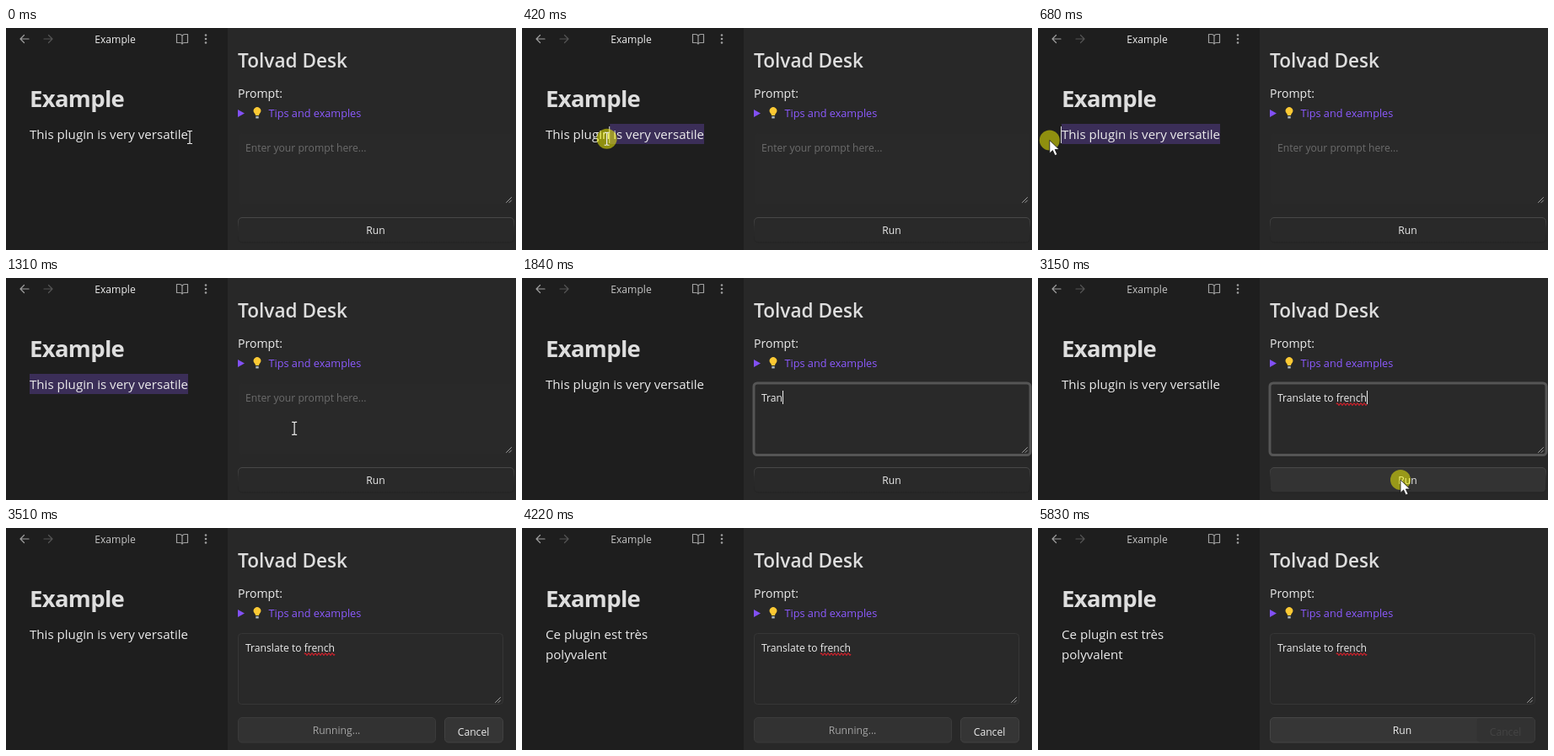
Recreate the animation shown at these times as an HTML page. Size 605 by 264 pixels, loop 6400 ms.

```html
<!DOCTYPE html>
<html lang="en">
<head>
<meta charset="utf-8">
<style>
  html, body { margin: 0; width: 100%; height: 100%; overflow: hidden; background: #1e1e1e; }
  svg { display: block; }
  text { font: 12.15px "Open Sans", "Noto Sans", sans-serif; fill: #ececec; white-space: pre; }
  .mid { text-anchor: middle; }
  .body { font-size: 15.1px; }
  .line { fill: none; stroke: #a0a0a0; stroke-width: 1.2; stroke-linecap: round; stroke-linejoin: round; }
</style>
</head>
<body>
<svg width="605" height="264" viewBox="0 0 605 264">
  <defs>
    <linearGradient id="edgeFade" x2="0" y2="1">
      <stop stop-color="#484848"/>
      <stop offset=".4" stop-color="#2c2c2c"/>
      <stop offset="1" stop-color="#222"/>
    </linearGradient>
  </defs>
  <rect width="605" height="264" fill="#1e1e1e"/>
  <rect x="263" width="342" height="264" fill="#282828"/>

  <!-- Note pane -->
  <path class="line" d="M27 13H17m4.500-4.500L17 13l4.500 4.500"/>
  <path class="line" style="stroke:#555" d="M45 13h10m-4.500-4.500L55 13l-4.500 4.500"/>
  <path class="line" d="M209 9.500v9.500M209 9.500q-1-2-3-2h-3.500v10h4q2 0 2.500 1.500q.5-1.500 2.500-1.500h4v-10h-3.500q-2 0-3 2"/>
  <g fill="#a0a0a0">
    <circle cx="237" cy="8.500" r="1.300"/><circle cx="237" cy="13" r="1.300"/><circle cx="237" cy="17.500" r="1.300"/>
  </g>
  <text id="tab" class="mid" x="129.500" y="18">Example</text>
  <text x="28" y="94" style="font-size:27.5px;font-weight:700;letter-spacing:-.025em;fill:#dedede">Example</text>
  <rect id="selection" y="114" height="24" fill="#3b2e58"/>
  <rect id="noteCaret" y="117" width="1" height="20" fill="#dadada"/>
  <text id="note" class="body" x="28" y="132">This plugin is very versatile</text>
  <g id="reply">
    <text class="body" x="28" y="132">Ce plugin est très</text>
    <text class="body" x="28" y="156">polyvalent</text>
  </g>

  <!-- Prompt pane -->
  <text x="275" y="47" style="font-size:22.6px;font-weight:600;fill:#dedede">Tolvad Desk</text>
  <text x="275" y="83" style="font-size:14.1px">Prompt:</text>
  <path d="M275 97l8 4.500l-8 4.500z" fill="#8250f5"/>
  <path d="M296 104q0-1.500-1.500-3a4.300 4.300 0 1 1 7 0q-1.500 1.500-1.500 3z" fill="#fcc934"/>
  <path d="M296.300 105h3.400v2.500h-3.400z" fill="#a8b4bc"/>
  <text x="311.500" y="106" style="font-size:12.7px;fill:#8c5aff">Tips and examples</text>

  <rect id="field" x="275.500" y="125.500" height="84" rx="4" fill="#292929"/>
  <rect id="ring" x="275" y="125" width="328" height="85.500" rx="4" fill="none" stroke="#555" stroke-width="3"/>
  <path id="grip" class="line" style="stroke-width:1" d="M-9.500 207.500l6-6M-6 207.500l2.500-2.500"/>
  <text id="hint" x="284" y="147" style="fill:#6c6c6c">Enter your prompt here...</text>
  <text id="typed" x="284" y="147"></text>
  <rect id="caret" y="134" width="1" height="16" fill="#f0f0f0"/>
  <path id="squiggle" fill="none" stroke="#e0202c" stroke-width="1.100"/>

  <g id="idle">
    <rect id="runBox" x="275.500" y="225.500" height="29.500" rx="4.500"/>
    <text id="run" class="mid" y="245">Run</text>
    <g id="ghost">
      <rect x="520.500" y="226" width="69" height="28.500" rx="4" fill="#323232"/>
      <text class="mid" x="554.500" y="247" style="fill:#444">Cancel</text>
    </g>
  </g>
  <g id="busy">
    <rect x="275.500" y="225.500" width="234" height="29.500" rx="4.500" fill="#323232" stroke="#3b3b3b"/>
    <text class="mid" x="392" y="245" style="fill:#a4a4a4">Running...</text>
    <rect x="520.500" y="225.500" width="69" height="29.500" rx="4.500" fill="#353535" stroke="#414141"/>
    <text class="mid" x="554.500" y="247">Cancel</text>
  </g>

  <g id="pointer">
    <circle id="press" r="12" fill="#ff0"/>
    <path id="arrow" d="M0 0v15.500l3.600-3.400l2.700 6l2.800-1.200l-2.700-5.900h5z" fill="#fff" stroke="#111" stroke-width=".8"/>
    <path id="beam" d="M-3-7.500h2.200l.8.800l.8-.8H3M0-6.700V6.700M-3 7.500h2.200l.8-.8l.8.800H3" fill="none" stroke="#eee" stroke-width="1.200"/>
  </g>
</svg>

<script>
const LOOP = 6400;
const FOCUS = 1620, SUBMIT = 3230, REPLY = 4220, DONE = 5830;
const PROMPT = "Translate to french";
const BURSTS = [[1680, 53, 4], [1990, 36, 11], [2500, 45, 4]]; // start, ms per key, keys

const el = {};
for (const node of document.querySelectorAll("[id]")) el[node.id] = node;

const clamp = (v, lo = 0, hi = 1) => Math.min(hi, Math.max(lo, v));
const span = (t, a, b) => clamp((t - a) / (b - a));
const mix = (a, b, p) => a + (b - a) * p;
const smooth = p => p * p * (3 - 2 * p);
const show = (node, on) => node.setAttribute("visibility", on ? "inherit" : "hidden");
const set = (node, attrs) => {
  for (const key in attrs) node.setAttribute(key, attrs[key]);
};

let wave = "M354 150";
for (let x = 354; x < 390; x += 4) wave += "q1-2.500 2 0t2 0";
set(el.squiggle, { d: wave });

function pointerAt(t) {
  if (t < 680) {
    const p = span(t, 70, 680);
    return [mix(218, 14, p), mix(130, 133, p)];
  }
  if (t < 980) return [mix(14, 7, span(t, 680, 710)), 133.5];
  if (t < 2950) {
    const p = smooth(span(t, 980, 1420));
    return [mix(7, 403, p), mix(133.5, 161, p) + 170 * p * (1 - p)];
  }
  if (t < 3260) {
    const p = smooth(span(t, 2950, 3050));
    return [mix(403, 430, p), mix(161, 240, p)];
  }
  const p = smooth(span(t, 3260, 3500));
  return [mix(430, 438, p), mix(240, 280, p)];
}

function pressAt(t) {
  if (t < 70) return 0;
  if (t < 1000) return 1 - span(t, 730, 820);
  if (t < FOCUS) return 0;
  if (t < 1680) return 1;
  return t < 3150 ? 0 : 1 - span(t, 3230, 3330);
}

function drawPointer(t) {
  const [x, y] = pointerAt(t);
  const overNote = x > 24 && x < 245 && y < 220;
  const overField = x > 275 && y < 210;
  const isBeam = overNote || overField;
  set(el.pointer, { transform: `translate(${x} ${y})` });
  set(el.press, { opacity: 0.5 * pressAt(t) });
  show(el.pointer, t < 1680 || (t > 2950 && t < 3500));
  show(el.beam, isBeam);
  show(el.arrow, !isBeam);
}

function drawNote(t) {
  const selecting = t >= 70 && t < FOCUS;
  show(el.note, t < REPLY);
  show(el.reply, t >= REPLY);
  show(el.selection, selecting);
  show(el.noteCaret, selecting && t < 1200);
  el.tab.style.fill = t < FOCUS ? "#ececec" : "#c4c4c4";
  if (!selecting) return;

  // Snap the selection start to the nearest letter
  const end = 28 + el.note.getComputedTextLength();
  const [x] = t < 710 ? pointerAt(t) : [0];
  let start = end;
  for (let i = 0; i < el.note.getNumberOfChars(); i++) {
    const edge = el.note.getStartPositionOfChar(i).x;
    if (Math.abs(edge - x) < Math.abs(start - x)) start = edge;
  }
  set(el.selection, { x: start, width: end - start });
  set(el.noteCaret, { x: start - 1 });
}

function drawField(t) {
  const focused = t >= FOCUS && t < SUBMIT;
  const width = t < SUBMIT ? 327 : 314;
  const keys = BURSTS.reduce((n, [start, gap, count]) =>
    n + clamp(Math.floor((t - start) / gap) + 1, 0, count), 0);
  el.typed.textContent = PROMPT.slice(0, keys);
  set(el.field, { width, stroke: t < SUBMIT ? "none" : "#363636" });
  set(el.grip, { transform: `translate(${276 + width} 0)` });
  set(el.caret, { x: 284 + (keys ? el.typed.getComputedTextLength() : 0) });
  show(el.ring, focused);
  show(el.hint, keys === 0);
  show(el.caret, focused);
  show(el.squiggle, t >= 2860);
}

function drawButtons(t) {
  const busy = t >= SUBMIT && t < DONE;
  const done = t >= DONE;
  const hover = t >= 3030 && t < SUBMIT;
  show(el.idle, !busy);
  show(el.busy, busy);
  show(el.ghost, done);
  set(el.runBox, {
    width: done ? 314 : 327,
    fill: done ? "#363636" : hover ? "#333" : "#292929",
    stroke: done ? "#454545" : "url(#edgeFade)"
  });
  set(el.run, { x: done ? 432 : 438.5 });
}

function frame() {
  const t = performance.now() % LOOP;
  drawNote(t);
  drawField(t);
  drawButtons(t);
  drawPointer(t);
  requestAnimationFrame(frame);
}
frame();
</script>
</body>
</html>
```
